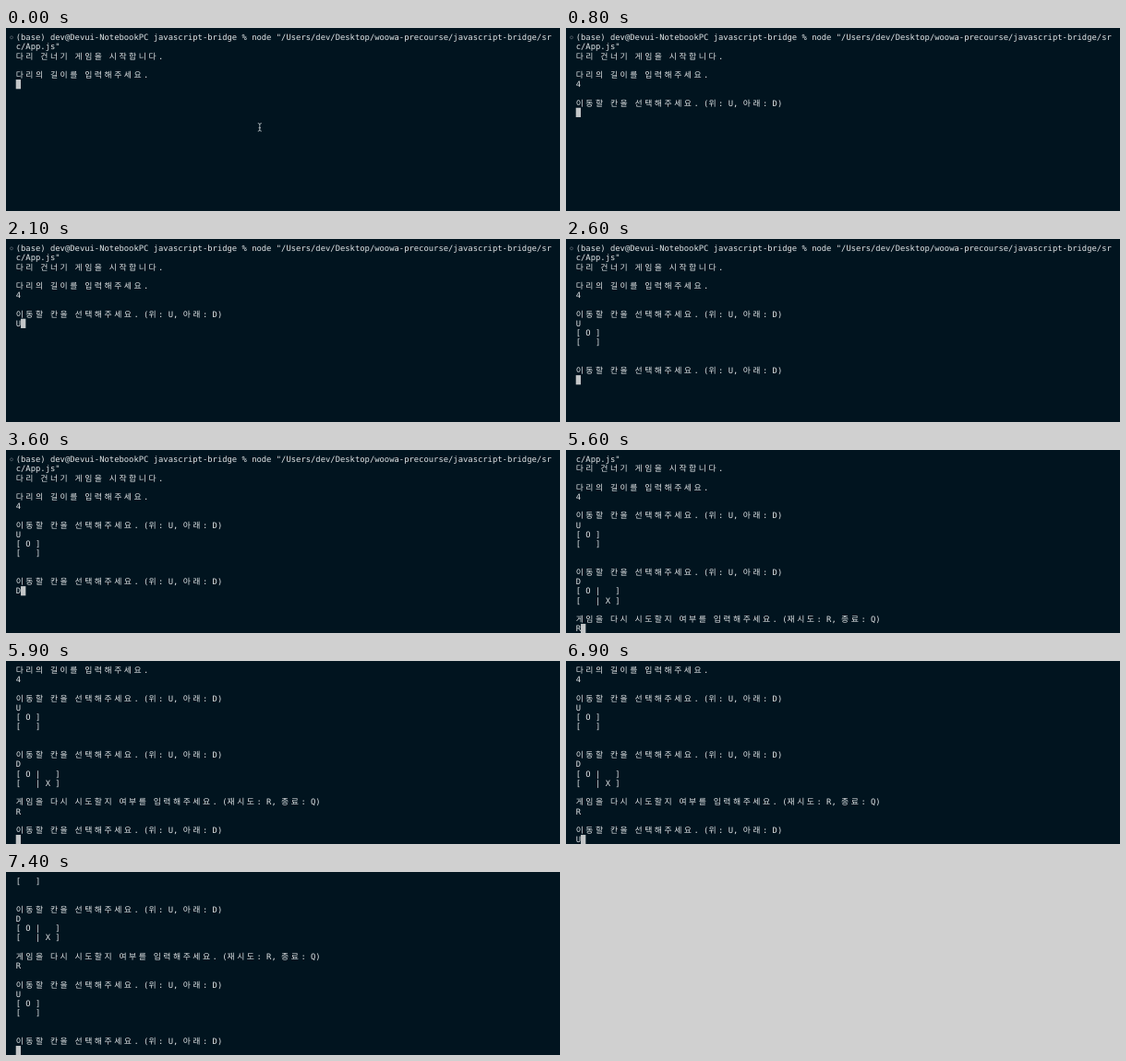
Animation, 600 px wide and 199 px high, one loop 8 s. Source, as an HTML page:

```html
<!DOCTYPE html>
<html lang="ko">
<head>
<meta charset="utf-8">
<title>Terminal: bridge game</title>
<style>
  html, body { margin: 0; width: 100%; height: 100%; overflow: hidden; background: #01141f; }
  svg { display: block; width: 600px; height: 199px; }
  text {
    font: 8.84px "DejaVu Sans Mono", "Noto Sans CJK KR", "Noto Sans CJK", monospace;
    fill: #e2e5e7;
    white-space: pre;
    text-rendering: geometricPrecision;
  }
</style>
</head>
<body>
<svg viewBox="0 0 600 199">
  <circle id="mark" cx="6" cy="10.3" r="1.5" fill="none" stroke="#56636b" stroke-width=".8"/>
  <g id="screen"></g>
  <rect id="cursor" fill="#c3c6c8"/>
  <path id="pointer" d="M272.8 103.6q2 0 2 1.4q0-1.4 2-1.4M274.8 105v6M272.8 112.2q2 0 2-1.4q0 1.4 2 1.4M273.6 108.6h2.4"
        fill="none" stroke="#b4bbc0" stroke-width=".9"/>
</svg>
<script>
const LOOP = 8000, ROWS = 19;
const LEFT = 10.7, TOP = 4.9, CELL = 5.322, LINE = 10.23, BASELINE = 8.2;

const askMove = '이동할 칸을 선택해주세요. (위: U, 아래: D)\n';
const firstStep = '[ O ]\n[   ]\n\n\n' + askMove;

// Terminal output as [time in ms, appended text]
const output = [
  [0, '(base) dev@Devui-NotebookPC javascript-bridge % node "/Users/dev/Desktop/woowa-precourse/javascript-bridge/sr\n' +
      'c/App.js"\n다리 건너기 게임을 시작합니다.\n\n다리의 길이를 입력해주세요.\n'],
  [100, '4'],
  [800, '\n\n' + askMove],
  [2100, 'U'],
  [2500, '\n'],
  [2600, firstStep],
  [3600, 'D'],
  [4100, '\n[ O |   ]\n[   | X ]\n\n게임을 다시 시도할지 여부를 입력해주세요. (재시도: R, 종료: Q)\n'],
  [5600, 'R'],
  [5900, '\n\n' + askMove],
  [6900, 'U'],
  [7400, '\n' + firstStep],
];

const [mark, screen, cursor, pointer] =
  ['mark', 'screen', 'cursor', 'pointer'].map(id => document.getElementById(id));

function setAttributes(element, attributes) {
  for (const name in attributes) element.setAttribute(name, attributes[name]);
  return element;
}

// Hangul takes two cells; the last position is the end of the line.
function cellPositions(line) {
  const positions = [LEFT];
  for (const char of line) positions.push(positions.at(-1) + CELL * (char >= '가' ? 2 : 1));
  return positions;
}

function drawLine(line, row) {
  const text = document.createElementNS('http://www.w3.org/2000/svg', 'text');
  text.textContent = line;
  return setAttributes(text, {
    x: cellPositions(line).slice(0, -1).map(x => x.toFixed(2)).join(' '),
    y: TOP + row * LINE + BASELINE,
  });
}

function drawScreen(count) {
  const lines = output.slice(0, count).map(([, text]) => text).join('').split('\n');
  const visible = lines.slice(-ROWS);
  screen.replaceChildren(...visible.map(drawLine));
  setAttributes(cursor, {
    x: cellPositions(visible.at(-1)).at(-1),
    y: TOP + (visible.length - 1) * LINE,
    width: CELL,
    height: LINE,
  });
  mark.style.display = lines.length > ROWS ? 'none' : '';
  pointer.style.display = count > 1 ? 'none' : '';
}

let shown = 0;
const start = performance.now();

function frame() {
  const time = (performance.now() - start) % LOOP;
  const count = output.filter(([at]) => at <= time).length;
  if (count !== shown) drawScreen(shown = count);
  requestAnimationFrame(frame);
}
frame();
</script>
</body>
</html>
```
